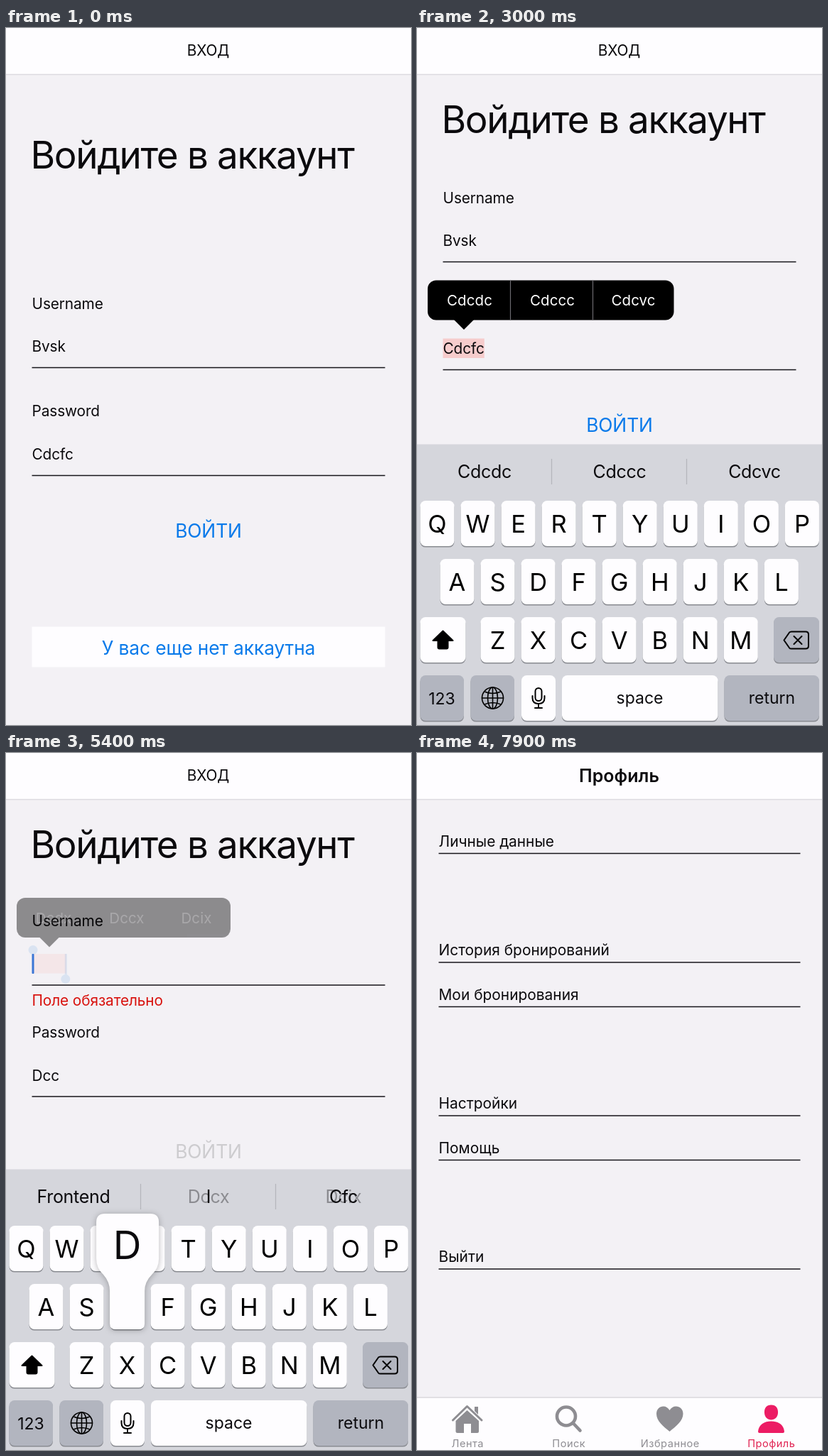
An HTML page that plays this animation: 570 px wide and 982 px high, repeating every 8000 ms.

```html
<!DOCTYPE html>
<html lang="ru">
<head>
<meta charset="utf-8">
<title>Вход</title>
<style>
html, body { margin: 0; width: 100%; height: 100%; overflow: hidden; background: #f3f1f5; }
svg { display: block; width: 570px; height: 982px; font-family: Inter, Roboto, sans-serif; }
text { white-space: pre; fill: #0b0a0d; }
.mid { text-anchor: middle; }
.s { font-size: 20.8px; letter-spacing: -.1px; }
.m { font-size: 26.4px; letter-spacing: -.1px; fill: #0a7aea; }
.h1 { font-size: 53px; letter-spacing: -1.35px; }
.title { font-size: 25px; font-weight: 600; }
.row { font-size: 20.9px; }
.tab { font-size: 14.6px; letter-spacing: .5px; fill: #8e8d92; }
.word { font-size: 25px; letter-spacing: -.3px; }
.letter { font-size: 34.5px; fill: #000; }
.big { font-size: 55px; }
.cmd { font-size: 23px; }
.err { fill: #d8100c; }
.tip text { fill: #fff; font-size: 20.5px; letter-spacing: .1px; }
.rule { stroke: #16151a; stroke-width: 1.7; }
.icon { fill: none; stroke: #000; stroke-width: 2; stroke-linejoin: round; stroke-linecap: round; }
.sel { fill: #f6cccc; }
.lift { filter: drop-shadow(0 1px 4px rgba(0,0,0,.28)); }
</style>
</head>
<body>
<svg viewBox="0 0 570 982">
  <rect width="570" height="982" fill="#f3f1f5"/>

  <g id="login">
    <text id="head" class="h1" x="34.5" y="198">Войдите в аккаунт</text>
    <g id="user">
      <text class="s" x="36.5" y="395.5">Username</text>
      <rect id="userSel" class="sel" x="36.5" y="434.5" height="27.5"/>
      <text id="userText" class="s" x="36.5" y="456"></text>
      <path class="rule" d="M36.5 478.5H533.5"/>
      <text id="userErr" class="s err" x="36.5" y="507">Поле обязательно</text>
      <g id="handles" fill="#4f9be0">
        <circle cx="38" cy="429" r="6.5"/>
        <g id="endHandle"><circle cy="470" r="6.5"/><rect x="-1" y="434.5" width="3" height="30"/></g>
      </g>
    </g>
    <g id="pass">
      <text class="s" x="36.5" y="547">Password</text>
      <rect id="passSel" class="sel" x="36.5" y="586.5" height="27.5"/>
      <text id="passText" class="s" x="36.5" y="608"></text>
      <path class="rule" d="M36.5 630.5H533.5"/>
      <text id="passErr" class="s err" x="36.5" y="659">Поле обязательно</text>
    </g>
    <rect id="caret" width="3" height="28" rx="1" fill="#3a76d6"/>
    <text id="enter" class="m mid" x="285" y="717.5">ВОЙТИ</text>
    <g id="join">
      <rect x="36.5" y="843.5" width="497" height="57" fill="#fefdff"/>
      <text class="m mid" x="285" y="882.5">У вас еще нет аккаутна</text>
    </g>
    <g id="passTip" class="tip"></g>
    <g id="userTip" class="tip"></g>
  </g>

  <g id="profile">
    <g id="rows"></g>
    <rect y="908" width="570" height="74" fill="#fefdff"/>
    <path d="M0 908H570" stroke="#dad8dd" stroke-width="1.5"/>
    <g fill="#8e8d92">
      <path d="M54.5 941L70.5 926L87 941V956Q87 958 85 958H76V945H66V958H57Q54.5 958 54.5 956ZM81 921H86V932L81 927Z"/>
      <path d="M50.5 940L70.5 920.5L91 940" fill="none" stroke="#8e8d92" stroke-width="3" stroke-linecap="round" stroke-linejoin="round"/>
      <g fill="none" stroke="#8e8d92" stroke-width="4.6" stroke-linecap="round"><circle cx="210" cy="934.5" r="13"/><path d="M220 944.5L229.5 954.5"/></g>
      <path d="M355.5 956C346 948 337 941 337 931C337 919 351 917 355.5 926C360 917 374.5 919 374.5 931C374.5 941 365 948 355.5 956Z"/>
    </g>
    <path fill="#ec1c64" d="M498.5 918.5C506 918.5 508.5 924 508 930C507.5 936 503.5 939.5 498.5 939.5C493.5 939.5 489.5 936 489 930C488.5 924 491 918.5 498.5 918.5ZM480 956C481 946 489 941.5 498.5 941.5C508 941.5 516 946 517 956Q517 958 515 958H482Q480 958 480 956Z"/>
    <g id="tabs"></g>
  </g>

  <rect width="570" height="65" fill="#fefdff"/>
  <path d="M0 65.5H570" stroke="#dcdadf" stroke-width="1.5"/>
  <text id="navLogin" class="s mid" x="284.5" y="39">ВХОД</text>
  <text id="navProfile" class="title mid" x="284.5" y="40.5">Профиль</text>

  <g id="board">
    <rect y="586.5" width="570" height="396" fill="#d5d6dc"/>
    <path d="M189.5 607V643M379.5 607V643" stroke="#b5b6bd" stroke-width="1.3"/>
    <g id="oldWords"></g>
    <g id="words"></g>
    <g id="keys"></g>
    <path id="shift" class="icon" d="M36.5 849.5L50.5 863H43.5V872.5Q43.5 874.5 41.5 874.5H31.5Q29.5 874.5 29.5 872.5V863H22.5Z"/>
    <path class="icon" d="M527 850.5H547Q551 850.5 551 854.5V870.5Q551 874.5 547 874.5H527Q525 874.5 524 873.3L516.5 862.5L524 851.7Q525 850.5 527 850.5ZM530.5 857L541.5 868M541.5 857L530.5 868"/>
    <g class="icon" style="stroke-width:1.6">
      <circle cx="106.5" cy="944" r="15"/>
      <ellipse cx="106.5" cy="944" rx="7" ry="15"/>
      <path d="M106.5 929V959M91.5 944H121.5M95 935Q106.5 940 118 935M95 953Q106.5 948 118 953"/>
    </g>
    <g class="icon">
      <rect x="166.5" y="930" width="9" height="18" rx="4.5"/>
      <path d="M162.5 941V944Q162.5 952 171 952Q179.5 952 179.5 944V941M171 952V958M166 958H176"/>
    </g>
    <g id="press" class="lift">
      <path fill="#fefdff" d="M139 649H203Q215 649 215 661V712Q215 726 205 735Q195 745 195 758V804Q195 812 187 812H154Q146 812 146 804V758Q146 745 137 735Q127 726 127 712V661Q127 649 139 649Z"/>
      <text id="pressText" class="big mid" x="170.5" y="712.5"></text>
    </g>
  </g>
</svg>

<script>
const $ = id => document.getElementById(id);
const LOOP = 8000, LEFT = 36.5, NAME = 'Bvsk', SECRET = 'Cdcfc';

function add(parent, tag, attrs, content) {
  const el = document.createElementNS('http://www.w3.org/2000/svg', tag);
  for (const k in attrs) el.setAttribute(k, attrs[k]);
  if (content !== undefined) el.textContent = content;
  return parent.appendChild(el);
}
const label = (parent, s, x, y, cls) => add(parent, 'text', { x, y, class: cls }, s);

// Profile screen
[['Личные данные', 141.5], ['История бронирований', 295], ['Мои бронирования', 357.5],
 ['Настройки', 511], ['Помощь', 573.5], ['Выйти', 727]].forEach(([s, y]) => {
  label($('rows'), s, 30.5, y - 10, 'row');
  add($('rows'), 'path', { d: `M30.5 ${y}H539.5`, class: 'rule' });
});
['Лента', 'Поиск', 'Избранное', 'Профиль'].forEach((s, i) => {
  const el = label($('tabs'), s, 71.3 + i * 142.5, 978.3, 'tab mid');
  if (i === 3) el.style.fill = '#e02352';
});

// Correction bubbles
function tip(g, top, right, tail, cuts, words) {
  add(g, 'rect', { x: 15, y: top, width: right - 15, height: 56, rx: 12 });
  add(g, 'path', { d: `M${tail - 14} ${top + 55.5}H${tail + 14}L${tail} ${top + 69.5}Z` });
  cuts.forEach(x => add(g, 'path', { d: `M${x} ${top}v56`, stroke: '#6c6b70', 'stroke-width': 1.2 }));
  const inner = add(g, 'g', {});
  words.forEach(([s, x]) => label(inner, s, x, top + 35.5, 'mid'));
  return inner;
}
tip($('passTip'), 355.5, 361.5, 66, [131.5, 247.5], [['Cdcdc', 74], ['Cdccc', 190.5], ['Cdcvc', 304.5]]);
tip($('userTip'), 204, 316, 61, [], [['Dcdx', 67], ['Dccx', 170], ['Dcix', 268]]).id = 'userTipWords';

// Keyboard
const GREY = '#b2b5bf', WHITE = '#fefdff', letters = {};
function key(x, y, w, fill) {
  add($('keys'), 'rect', { x, y: y + 1.6, width: w, height: 64, rx: 7.5, fill: '#898b91' });
  return add($('keys'), 'rect', { x, y, width: w, height: 64, rx: 7.5, fill });
}
[['QWERTYUIOP', 4.5], ['ASDFGHJKL', 32.5], ['ZXCVBNM', 89.5]].forEach(([row, x0], r) => {
  [...row].forEach((c, i) => {
    const x = x0 + i * 57.05, y = 666 + r * 82;
    key(x, y, 48, WHITE);
    letters[c] = { el: label($('keys'), c, x + 24, y, 'letter mid'), x: x + 24, y };
  });
});
const shiftKey = key(4.5, 830, 64, WHITE), backKey = key(502, 830, 64, GREY);
key(4.5, 912, 61.5, GREY);
key(75.5, 912, 61.5, GREY);
key(147, 912, 48, WHITE);
key(204, 912, 219.5, WHITE);
key(432.5, 912, 133.5, GREY);
label($('keys'), '123', 35, 952.5, 'cmd mid');
label($('keys'), 'space', 313.5, 951.5, 'cmd mid');
label($('keys'), 'return', 499.5, 951.5, 'cmd mid');
const slots = id => [95, 285, 475].map(x => label($(id), '', x, 633.5, 'word mid'));
const words = slots('words'), oldWords = slots('oldWords');
['', 'Dccx', 'Dcix'].forEach((s, i) => oldWords[i].textContent = s);

// Timelines: [time, value]
const step = (t, list) => list.reduce((v, [at, val]) => t >= at ? val : v, list[0][1]);
function ramp(t, list) {
  const i = list.findIndex(p => p[0] > t);
  if (i < 0) return list[list.length - 1][1];
  if (!i) return list[0][1];
  const [a, va] = list[i - 1], [b, vb] = list[i];
  return va + (vb - va) * (t - a) / (b - a);
}
const within = (t, spans) => spans.some(([a, b]) => t >= a && t < b);

const boardY = [[2450, 396], [2500, 362.5], [2600, 170], [2700, 62], [2800, 18], [2900, 0],
                [6750, 0], [6850, 110], [6950, 270], [7050, 360], [7150, 396]];
const formY = [[2450, 0], [2500, -7], [2600, -88], [2700, -130], [2800, -144], [2900, -149]];
const headY = [[2400, 0], [2490, -50]];
const joinY = [[2450, 0], [2500, -11.5], [2600, -130], [2700, -215], [2800, -240], [2900, -250]];
const userTyped = [[0, NAME], [5250, ''], [5450, 'D'], [5750, 'Dd']];
const passTyped = [[0, SECRET], [3250, ''], [3700, 'D'], [3980, 'Dc'], [4180, 'Dcc']];
const none = ['', '', ''], empty = ['Frontend', 'I', 'Cfc'], did = ['“D”', 'Did', 'Do'];
const hints = [[0, none], [2650, ['Cdcdc', 'Cdccc', 'Cdcvc']], [3250, empty], [3700, did],
               [3980, ['“Dc”', '', '']], [4180, ['“Dcc”', '', '']], [4850, ['Dcdx', 'Dccx', 'Dcix']],
               [5280, empty], [5450, did], [5750, ['“Dd”', 'Did', 'Do']]];
// [from, to, letter shown]
const presses = [[3630, 3740, 'D'], [3930, 4040, 'c'], [4130, 4240, 'c'], [5330, 5440, 'D'], [5690, 5800, 'd']];

const moveY = (id, y) => $(id).setAttribute('transform', `translate(0 ${y})`);
const show = (id, on) => $(id).style.display = on ? '' : 'none';
const fade = (id, v) => $(id).style.opacity = v;

function setCase(upper) {
  for (const c in letters) {
    const k = letters[c];
    k.el.textContent = upper ? c : c.toLowerCase();
    k.el.setAttribute('y', k.y + (upper ? 44.8 : 40.7));
  }
  shiftKey.setAttribute('fill', upper ? WHITE : GREY);
  $('shift').style.fill = upper ? '#000' : 'none';
}

function measure() {
  const w = s => { $('userText').textContent = s; return $('userText').getComputedTextLength(); };
  $('passSel').setAttribute('width', w(SECRET));
  const nameW = w(NAME);
  $('userSel').setAttribute('width', nameW + 1);
  $('endHandle').setAttribute('transform', `translate(${LEFT + nameW})`);
}

function draw(t) {
  const userErr = within(t, [[5250, 5450]]), passErr = within(t, [[3250, 3700]]);
  const bad = userErr || passErr, form = ramp(t, formY), gap = bad ? 2.5 : 0;
  const userY = form - gap, passY = form + (userErr ? gap : -gap);
  moveY('head', ramp(t, headY));
  moveY('user', userY);
  moveY('pass', passY);
  moveY('enter', form + gap);
  moveY('join', ramp(t, joinY));
  moveY('board', ramp(t, boardY));

  $('userText').textContent = step(t, userTyped);
  $('passText').textContent = step(t, passTyped);
  show('userErr', userErr);
  show('passErr', passErr);
  $('enter').style.fill = bad ? '#cdcccf' : '';
  fade('enter', ramp(t, [[6400, 1], [6490, .2]]));

  fade('passSel', ramp(t, [[2380, 0], [2400, 1], [3250, 1], [3400, 0]]));
  fade('userSel', ramp(t, [[4830, 0], [4850, 1], [5290, 1], [5450, 0]]));
  fade('handles', ramp(t, [[4830, 0], [4850, 1], [5250, 1], [5400, .15], [5480, 0]]));
  fade('passTip', ramp(t, [[2820, 0], [2950, 1], [3250, 1], [3400, 0]]));
  fade('userTip', ramp(t, [[4850, 0], [4980, 1], [5290, 1], [5480, 0]]));
  fade('userTipWords', ramp(t, [[5290, 1], [5440, 0]]));

  const inUser = t > 4700, field = $(inUser ? 'userText' : 'passText');
  show('caret', within(t, [[3250, 4680], [4750, 4850], [5250, 6260]]));
  $('caret').setAttribute('x', LEFT + field.getComputedTextLength());
  $('caret').setAttribute('y', inUser ? 434.5 + userY : 586 + passY);

  step(t, hints).forEach((s, i) => words[i].textContent = s);
  fade('oldWords', t < 5280 ? 0 : ramp(t, [[5280, .9], [5480, 0]]));
  setCase(step(t, [[0, true], [3700, false], [4850, true], [5450, false]]));
  backKey.setAttribute('fill', within(t, [[3180, 3290], [5180, 5290]]) ? WHITE : GREY);

  const hit = presses.find(([a, b]) => t >= a && t < b);
  show('press', hit);
  if (hit) {
    const k = letters[hit[2].toUpperCase()];
    $('press').setAttribute('transform', `translate(${k.x - 170.5} ${k.y - 748})`);
    $('pressText').textContent = hit[2];
  }

  const inside = t >= 6750;
  show('login', !inside);
  show('navLogin', !inside);
  show('profile', inside);
  show('navProfile', inside);
}

let start;
function tick(now) {
  if (start === undefined) start = now;
  draw((now - start) % LOOP);
  requestAnimationFrame(tick);
}
measure();
draw(0);
requestAnimationFrame(tick);
</script>
</body>
</html>
```
